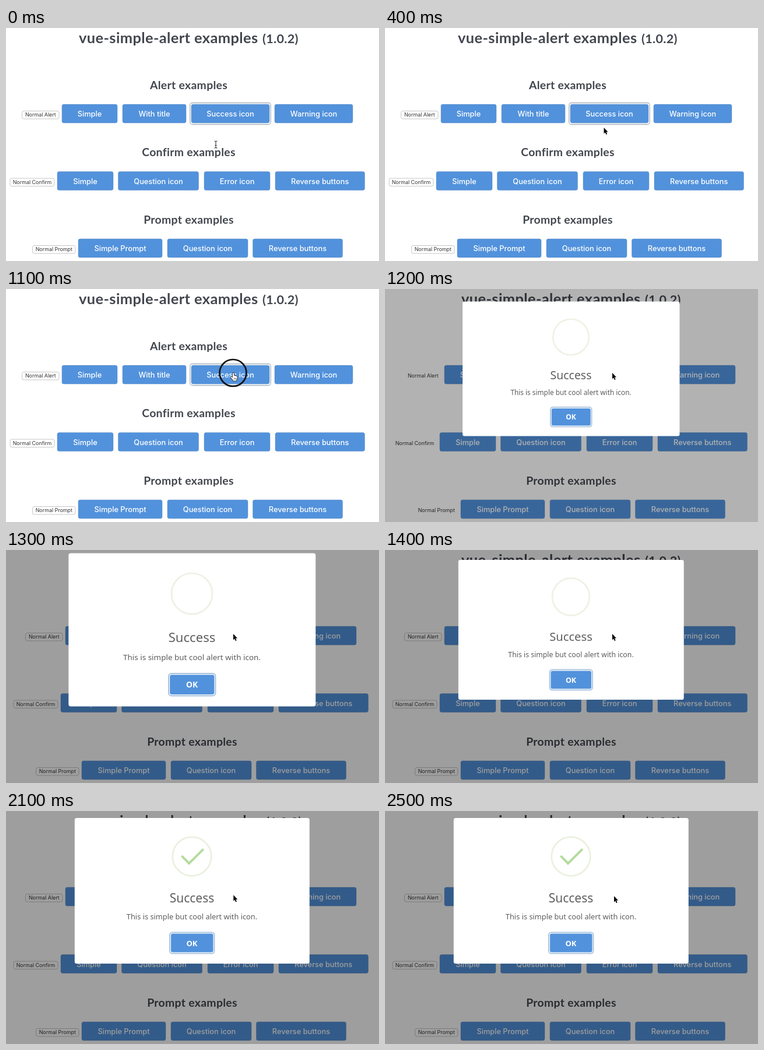
Write an HTML page with a canvas that moves like this. It is 640 by 400 pixels and loops after 2600 ms.

```html
<!DOCTYPE html>
<html lang="en">
<head>
<meta charset="utf-8">
<title>vue-simple-alert examples</title>
<style>
  html, body { margin: 0; width: 100%; height: 100%; overflow: hidden; background: #fff; }
  canvas { display: block; }
</style>
</head>
<body>
<canvas id="stage" width="640" height="400"></canvas>
<script>
const ctx = document.getElementById('stage').getContext('2d');
const LOOP = 2600, STEP = 100;
const OPEN_AT = 1150, CLICK_AT = 1000;
const BLUE = '#5292dc', EDGE = 'rgba(95, 140, 190, .6)';
const HEADING = 'Lato, sans-serif', UI = 'Inter, sans-serif', DIALOG = '"Noto Sans", sans-serif';

const rows = [
  { title: 'Alert examples', center: 313.5, y: 131, plain: ['Normal Alert', 27, 64.5],
    buttons: [['Simple', 96, 95], ['With title', 200, 109], ['Success icon', 318, 134], ['Warning icon', 461, 134]] },
  { title: 'Confirm examples', center: 313.5, y: 246.5, plain: ['Normal Confirm', 6.5, 77],
    buttons: [['Simple', 88, 96], ['Question icon', 192.5, 138], ['Error icon', 340, 113], ['Reverse buttons', 462, 153.5]] },
  { title: 'Prompt examples', center: 313.5, y: 362, plain: ['Normal Prompt', 45, 74.5],
    buttons: [['Simple Prompt', 124, 144], ['Question icon', 277, 138], ['Reverse buttons', 423.5, 154]] }
];

const clamp = p => Math.min(1, Math.max(0, p));
const smooth = p => { p = clamp(p); return p * p * (3 - 2 * p); };
const mix = (a, b, p) => a + (b - a) * p;

// CSS "ease": cubic-bezier(.25, .1, .25, 1)
function ease(x) {
  const bezier = (s, a, b) => 3 * a * s * (1 - s) ** 2 + 3 * b * s * s * (1 - s) + s ** 3;
  let lo = 0, hi = 1;
  for (let i = 0; i < 20; i++) {
    const mid = (lo + hi) / 2;
    if (bezier(mid, .25, .25) < x) lo = mid; else hi = mid;
  }
  return bezier(lo, .1, 1);
}

// Each key is [offset, ...values]
function keyframes(keys, p) {
  const i = keys.findIndex(k => k[0] >= p);
  const b = keys[i], a = keys[Math.max(0, i - 1)];
  const q = a === b ? 1 : ease((p - a[0]) / (b[0] - a[0]));
  return b.slice(1).map((v, n) => mix(a[n + 1], v, q));
}

function text(str, x, y, font, color, align = 'center', spacing = 0) {
  ctx.font = font;
  ctx.letterSpacing = spacing + 'px';
  ctx.fillStyle = color;
  ctx.textAlign = align;
  ctx.fillText(str, x, y);
}

function box(x, y, w, h, r, fill, stroke, lineWidth = 1) {
  ctx.beginPath();
  ctx.roundRect(x, y, w, h, r);
  if (fill) { ctx.fillStyle = fill; ctx.fill(); }
  if (stroke) { ctx.strokeStyle = stroke; ctx.lineWidth = lineWidth; ctx.stroke(); }
}

function drawPage(chrome) {
  const ink = '#42464e';
  text('vue-simple-alert examples', 125, 25.8, '700 25.4px ' + HEADING, ink, 'left', .4);
  text('(1.0.2)', 440, 25.8, '700 21.6px ' + HEADING, ink, 'left', .3);
  for (const { title, center, y, plain, buttons } of rows) {
    text(title, center, y - 26.4, '700 19.4px ' + HEADING, ink, 'center', .3);
    const [label, px, pw] = plain;
    if (chrome) box(px + .5, y + 11.5, pw - 1, 13.5, 3, '#fff', '#c6c6c6');
    text(label, px + pw / 2, y + 21.2, '400 8.9px ' + UI, '#333');
    for (const [name, x, w] of buttons) {
      if (name === 'Success icon') box(x - 2.2, y - 2.5, w + 4.4, 37, 4, '#fff', '#a9b3bd', 1.3);
      box(x, y, w, 32, 3.2, BLUE, EDGE, .8);
      text(name, x + w / 2, y + 21, '500 12.8px ' + UI, '#fff');
    }
  }
}

const tipKeys = [ // offset, left, top, width
  [0, .0625, 1.1875, 0], [.54, .125, 1.0625, 0], [.7, -.375, 2.1875, 3.125],
  [.84, 1.3125, 3, 1.0625], [1, .875, 2.8125, 1.5625]];
const longKeys = [ // offset, right, top, width
  [0, 2.875, 3.375, 0], [.65, 2.875, 3.375, 0], [.84, 0, 2.1875, 3.4375], [1, .5, 2.375, 2.9375]];

function drawIcon(p) {
  const em = 12.7, thick = .3125;
  ctx.save();
  ctx.translate(319, 78);
  ctx.beginPath();
  ctx.arc(0, 0, 33.3, 0, 7);
  ctx.strokeStyle = p > .5 ? '#eaf1df' : '#f1f0e5';
  ctx.lineWidth = 2.8;
  ctx.stroke();
  ctx.scale(em, em);
  const bar = (cx, top, w, angle) => {
    if (w <= 0) return;
    ctx.save();
    ctx.translate(cx - 2.5, top + thick / 2 - 2.5);
    ctx.rotate(angle);
    box(-w / 2, -thick / 2, w, thick, .125, '#b3dc9c');
    ctx.restore();
  };
  const [left, tipTop, tipW] = keyframes(tipKeys, p);
  const [right, longTop, longW] = keyframes(longKeys, p);
  bar(left + tipW / 2, tipTop, tipW, Math.PI / 4);
  bar(5 - right - longW / 2, longTop, longW, -Math.PI / 4);
  ctx.restore();
}

function drawDialog(t) {
  const scale = [.924, 1.052, .96][Math.floor((t - OPEN_AT) / STEP)] ?? 1;
  ctx.save();
  ctx.translate(319.3, 137);
  ctx.scale(scale, scale);
  ctx.translate(-319.3, -137);
  box(117.8, 12, 403, 250, 3.5, '#fff');
  drawIcon(clamp((t - OPEN_AT) / 750));
  text('Success', 319, 157, '500 21px ' + DIALOG, '#5f5f5f');
  text('This is simple but cool alert with icon.', 319, 186, '400 12.8px ' + DIALOG, '#5c5c5c');
  box(281, 208.3, 76.5, 36.4, 4.5, '#fff', '#a5c0dd', 1.8);
  box(283, 210.5, 72.5, 32, 3, BLUE);
  text('OK', 319, 231.5, '700 13px ' + DIALOG, '#fff');
  ctx.restore();
}

const arrow = new Path2D('M0 0V10.4L2.3 8.3L3.9 12L5.6 11.2L4 7.6H7Z');
const hand = new Path2D('M-1 1Q0-1 1 1V5Q2 4 3 5.2Q4.2 4.4 5 5.8Q6.4 5.4 6.6 7V9.5L5.4 12V13.5H-.6V12L-4 8.2Q-4.4 6.4-2.6 7L-1 8.6Z');
const beam = new Path2D('M-2.5-6Q0-6 0-4.5Q0-6 2.5-6M0-4.5V4.5M-2.5 6Q0 6 0 4.5Q0 6 2.5 6M-1.5 1.5H1.5');

function drawCursor(t) {
  const move = smooth(t / 780), drift = smooth((t - 2000) / 500);
  const x = 360 + 30 * move + 3 * drift, y = 200 - 56 * move + 2 * drift;
  const open = t >= OPEN_AT;
  ctx.save();
  ctx.translate(x, y);
  ctx.lineJoin = 'round';
  const paint = (path, stroke, width, fill) => {
    ctx.strokeStyle = stroke;
    ctx.lineWidth = width;
    ctx.stroke(path);
    if (fill) { ctx.fillStyle = fill; ctx.fill(path); }
  };
  if (y > 197) {
    paint(beam, '#fff', 2.4);
    paint(beam, '#333', 1.1);
  } else if (!open && y < 163) {
    paint(hand, '#222', 1.6, '#fff');
    ctx.beginPath();
    for (const hx of [1.2, 3, 4.7]) { ctx.moveTo(hx, 8.5); ctx.lineTo(hx, 11.5); }
    ctx.lineWidth = .6;
    ctx.stroke();
  } else {
    paint(arrow, '#fff', 1.8, '#000');
  }
  if (t >= CLICK_AT && !open) {
    ctx.beginPath();
    ctx.arc(-.5, 0, 23, 0, 7);
    ctx.strokeStyle = '#111';
    ctx.lineWidth = 2.7;
    ctx.stroke();
  }
  ctx.restore();
}

function draw(t) {
  const open = t >= OPEN_AT, opening = open && t < OPEN_AT + STEP;
  ctx.fillStyle = '#fff';
  ctx.fillRect(0, 0, 640, 400);
  ctx.save();
  if (open) ctx.translate(6, 0); // the page recentres without its scrollbar
  drawPage(!opening);
  ctx.restore();
  if (open) {
    ctx.fillStyle = `rgba(0, 0, 0, ${opening ? .3 : .38})`;
    ctx.fillRect(0, 0, 640, 400);
    drawDialog(t);
  }
  drawCursor(t);
}

const start = performance.now();
function tick() {
  const t = (performance.now() - start) % LOOP;
  draw(Math.floor(t / STEP) * STEP);
  requestAnimationFrame(tick);
}
tick();
</script>
</body>
</html>
```
